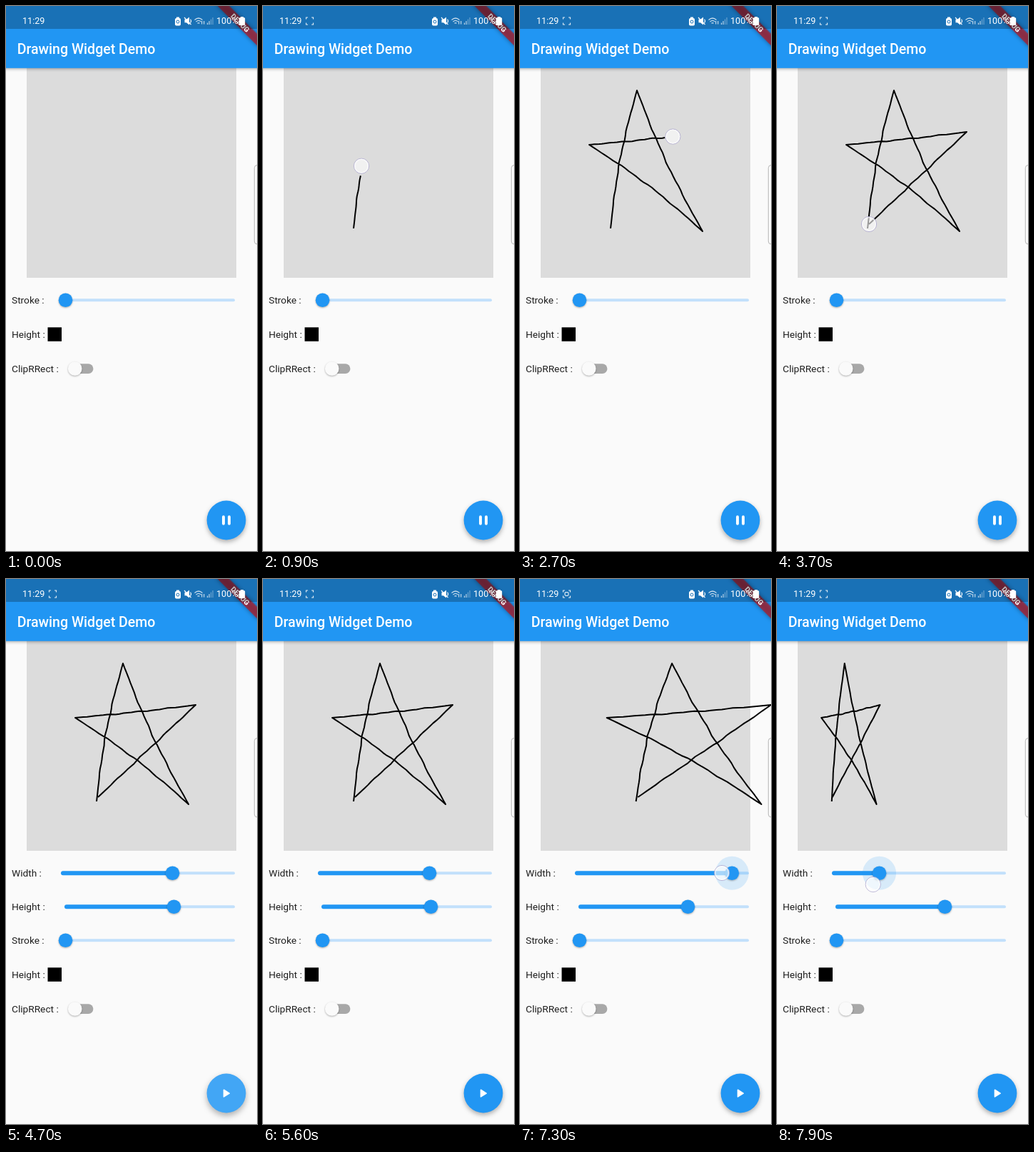
An HTML page for the animation above (8 s loop, 352x762 px).

```html
<!DOCTYPE html>
<html lang="en">
<head>
<meta charset="utf-8">
<title>Drawing Widget Demo</title>
<style>
  html, body { margin: 0; width: 100%; height: 100%; overflow: hidden; background: #fafafa; }
  svg { display: block; width: 100vw; height: 100vh; }
  text { font-family: Roboto, sans-serif; font-size: 13.7px; fill: #1f1f1f; }
  .title { font-size: 19.55px; font-weight: 500; fill: #fff; }
  .status { font-size: 12.6px; fill: #fff; }
  .debug { font-size: 10px; font-weight: 900; fill: #fff; text-anchor: middle; }
  .line { fill: none; stroke: #000; stroke-width: 2; stroke-linejoin: round; }
  .icon { fill: none; stroke: #fff; stroke-width: 1.2; }
  .soft { filter: drop-shadow(0 1px 1px rgba(0, 0, 0, .3)); }
</style>
</head>
<body>
<svg viewBox="0 0 352 762">
  <defs>
    <clipPath id="fabClip"><circle cx="309" cy="719" r="27.4"/></clipPath>
  </defs>
  <rect width="352" height="762" fill="#fafafa"/>
  <rect x="29" y="80" width="294" height="300" fill="#dcdcdc"/>
  <polyline id="star" class="line"/>

  <g id="sizeRows"></g>
  <g id="baseRows">
    <g id="strokeRow"></g>
    <text x="8" y="464">Height :</text>
    <rect x="58.5" y="449.3" width="19.5" height="19.5" fill="#000"/>
    <text x="8" y="512">ClipRRect :</text>
    <rect x="90" y="500.2" width="32.4" height="13.7" rx="6.85" fill="#a8a8a8"/>
    <circle class="soft" cx="96.7" cy="507" r="9.8" fill="#fafafa"/>
  </g>

  <g id="fab">
    <circle cx="309" cy="719" r="27.4" fill="#2196f3"/>
    <circle id="ripple" cx="309" cy="719" fill="#fff" clip-path="url(#fabClip)"/>
    <path id="pause" fill="none" stroke="#fff" stroke-width="3.9" stroke-linecap="round" d="M305 714.3v9.4M313 714.3v9.4"/>
    <path id="play" fill="#fff" stroke="#fff" stroke-width="1.6" stroke-linejoin="round" d="M305.5 714.3v9.6l7.7-4.8z"/>
  </g>

  <g style="filter: drop-shadow(0 1.5px 2px rgba(0, 0, 0, .35))">
    <rect x="-8" y="-8" width="368" height="94.8" fill="#2196f3"/>
  </g>
  <text class="title" x="15.7" y="67.3">Drawing Widget Demo</text>
  <g transform="translate(352 0) rotate(45)">
    <rect x="-42" y="27.4" width="84" height="11.7" fill="#b01a26" fill-opacity=".75"
          style="filter: drop-shadow(0 0 3px rgba(0, 0, 0, .5))"/>
    <text class="debug" x="0" y="36.9">DEBUG</text>
  </g>
  <rect width="352" height="32" fill="#000" fill-opacity=".25"/>

  <text class="status" x="23" y="25.3">11:29</text>
  <g id="capture" class="icon" stroke-opacity=".85">
    <path d="M60.5 18.5v-2.5h2.5M68 16h2.5v2.5M70.5 23.5v2.5h-2.5M63 26h-2.5v-2.5"/>
    <rect id="captureDot" x="63" y="18.7" width="5" height="4.6" rx="1.2"/>
  </g>
  <rect x="237" y="17" width="8" height="10.5" rx="2" fill="#fff"/>
  <rect x="239" y="15.5" width="4" height="2" fill="#fff"/>
  <circle cx="241" cy="22" r="2" fill="none" stroke="#1970b6"/>
  <path fill="#fff" d="M250.5 18.8h2.5l4-3.3v11l-4-3.3h-2.5z"/>
  <path class="icon" d="M250 16l9.5 10M258.5 18.5q2 2.5 0 5"/>
  <path class="icon" stroke-opacity=".75" d="M264.5 19.5q5.5-5 11 0M266.5 22q3.5-3.2 7 0M268.5 24.3q1.5-1.4 3 0M274.7 21v4.5M277.7 21v4.5"/>
  <path class="icon" stroke-opacity=".7" d="M282.5 26v-2.5M285 26v-5"/>
  <path class="icon" stroke-opacity=".35" d="M287.5 26v-7.5M290 26v-10"/>
  <text class="status" x="295" y="25.3">100%</text>
  <path fill="#fff" d="M329 15h4v1.3h1a1.2 1.2 0 0 1 1.2 1.2v8.3a1.2 1.2 0 0 1-1.2 1.2h-6a1.2 1.2 0 0 1-1.2-1.2v-8.3a1.2 1.2 0 0 1 1.2-1.2h1z"/>

  <rect x="348.3" y="222.5" width="12" height="110.5" rx="4" fill="#fbfbfb" stroke="#b5b5b5"/>
  <g id="finger">
    <circle r="10.6" fill="#fff" fill-opacity=".6" stroke="#aaa4cc" stroke-opacity=".8"/>
    <circle r="9.3" fill="none" stroke="#fff" stroke-width="1.6" stroke-opacity=".6"/>
  </g>
</svg>
<script>
const LOOP = 8000;
const LEFT = 29, THUMB_X = 233.5, SCALE_PER_PX = 0.0057;
const LEG_START = 640, LEG_STEP = 570, LEG_TIME = 560;
const $ = id => document.getElementById(id);

// Star corners: x, y and how far the leg that starts here bows sideways.
const corners = [[127, 311, -5], [164, 118, 5], [256, 315, 5], [97, 194, 1], [266, 176, 0], [129, 305, 0]];
// Drags of the width thumb: from, to (ms) and distance.
const drags = [[6600, 6860, 70.5], [7250, 7680, -196], [7680, 7860, 37], [7880, 8000, -20]];

const clamp = v => Math.max(0, Math.min(1, v));
const ramp = (t, a, b) => clamp((t - a) / (b - a));
const ease = (t, a, b) => (1 - Math.cos(Math.PI * ramp(t, a, b))) / 2;
const mix = (a, b, k) => a + (b - a) * k;

// A hand-drawn leg: a straight line, bowed and slightly shaky.
function legPoint(i, u) {
  const [ax, ay, bow] = corners[i], [bx, by] = corners[i + 1];
  const dx = bx - ax, dy = by - ay, length = Math.hypot(dx, dy);
  const shake = 0.5 * Math.sin(u * 23 + i * 2) + 0.4 * Math.sin(u * 51 + i);
  const side = (bow + shake) * Math.sin(Math.PI * u) / length;
  return [mix(ax, bx, u) - dy * side, mix(ay, by, u) + dx * side];
}

function trace(t) {
  const points = [];
  for (let i = 0; i < corners.length - 1; i++) {
    const from = LEG_START + i * LEG_STEP;
    const end = ease(t, from, from + LEG_TIME);
    if (end === 0) break;
    for (let k = 0; k <= 30; k++) points.push(legPoint(i, end * k / 30));
  }
  return points;
}

const thumbAt = t => drags.reduce((x, [a, b, d]) => x + d * ease(t, a, b), THUMB_X);

function slider(label, y, start, x, id) {
  const mid = y + 0.3;
  return `<text x="8" y="${y + 5}">${label} :</text>
    <rect x="${start}" y="${mid - 2}" width="${321 - start}" height="4" rx="2" fill="#c2e0fb"/>
    <rect id="${id}Fill" x="${start}" y="${mid - 3}" width="${x - start}" height="6" rx="3" fill="#2196f3"/>
    <circle id="${id}Halo" cx="${x}" cy="${mid}" r="0" fill="#2196f3" fill-opacity=".16"/>
    <circle id="${id}Thumb" class="soft" cx="${x}" cy="${mid}" r="9.8" fill="#2196f3"/>`;
}

$('sizeRows').innerHTML = slider('Width', 411, 77, THUMB_X, 'width') + slider('Height', 458, 82, 235.5, 'height');
$('strokeRow').innerHTML = slider('Stroke', 411, 81, 83.5, 'stroke');

const set = (id, attrs) => Object.entries(attrs).forEach(([k, v]) => $(id).setAttribute(k, v));
const show = (id, on) => set(id, { visibility: on ? 'visible' : 'hidden' });

function fingerAt(t) {
  if (t >= 540 && t < 3880) return trace(t).pop() || corners[0];
  if (t >= 4280 && t < 4480) return [311, 722];
  if (t >= 6580) return [thumbAt(t + 40), 411 + 16 * ramp(t, 7350, 7880)];
  return null;
}

function render(t) {
  const thumb = thumbAt(t);
  const scale = 1 + (thumb - THUMB_X) * SCALE_PER_PX;
  const points = trace(t - 25)
    .map(([x, y]) => `${(LEFT + (x - LEFT) * scale).toFixed(2)},${y.toFixed(2)}`);
  set('star', { points: points.join(' ') });

  set('widthFill', { width: thumb - 77 });
  set('widthThumb', { cx: thumb });
  set('widthHalo', { cx: thumb, r: 23.5 * ramp(t, 6580, 6680) });

  const stopped = t >= 4500;
  show('sizeRows', stopped);
  set('baseRows', { transform: `translate(0 ${stopped ? 94 : 0})` });
  show('play', stopped);
  show('pause', !stopped);

  const press = ramp(t, 4300, 4450) * (1 - ramp(t, 4600, 4850));
  $('fab').style.filter = `drop-shadow(0 ${3 + 2 * press}px ${3 + 2 * press}px rgba(0, 0, 0, .3))`;
  set('ripple', { r: 38 * ramp(t, 4300, 4650), opacity: 0.25 * press });

  show('capture', t >= 100);
  show('captureDot', t >= 100 && (t - 100) % 1000 < 500);

  const finger = fingerAt(t);
  show('finger', finger);
  if (finger) set('finger', { transform: `translate(${finger[0]} ${finger[1]})` });
}

const start = performance.now();
function tick() {
  render((performance.now() - start) % LOOP);
  requestAnimationFrame(tick);
}
tick();
</script>
</body>
</html>
```
